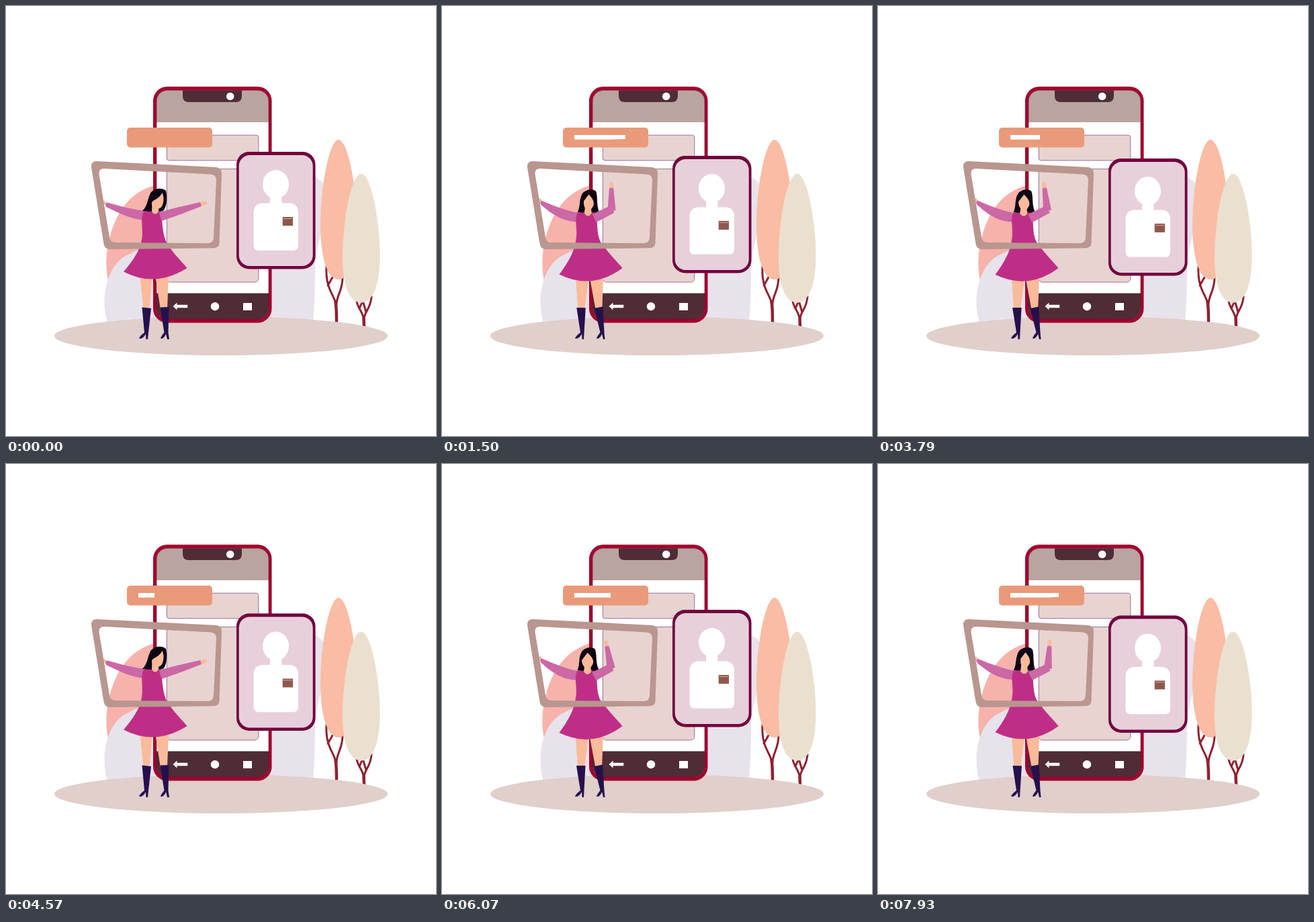
Recreate the animation shown at these times as an HTML page. Size 640x640 px, loop 8 s.

```html
<!DOCTYPE html>
<html lang="en">
<head>
<meta charset="utf-8">
<title>Phone scene</title>
<style>
  html, body { margin: 0; width: 100%; height: 100%; overflow: hidden; background: #fff; }
  svg { display: block; width: 100vw; height: 100vh; }
</style>
</head>
<body>
<svg viewBox="0 0 640 640">
  <defs>
    <clipPath id="reveal"><rect id="revealBox" x="197" y="185" width="0" height="20"/></clipPath>
    <clipPath id="screen"><rect x="224" y="125.500" width="167" height="340.500" rx="16"/></clipPath>
  </defs>

  <!-- backdrop -->
  <path fill="#f7b2ab" d="M153 414C146 385 149 354 161 324C174 292 196 273 222 267L240 400Z"/>
  <path fill="#e8e2eb" d="M151 472C141 440 147 392 176 373C230 345 320 310 400 270C440 245 470 249 478 275C483 308 462 345 460 390Q460 430 457 472Z"/>

  <!-- trees -->
  <g fill="none" stroke="#8f2230" stroke-width="3" stroke-linecap="round">
    <path stroke-width="4.500" d="M492 472Q492 450 490.500 440"/>
    <path d="M490.500 443C489 430 475 421 477 388M479 416L487 402M492 444C492 430 501 425 501 403"/>
    <path stroke-width="4.500" d="M533 478L532.500 465"/>
    <path d="M532.500 468C532 455 524 452 522 439M533 466C533 455 543 451 544 432M536 456L532 442M526 450L530 441"/>
  </g>
  <path fill="#fabca4" d="M495 199C508 199 522 265 522 325C522 380 511 407 495 407C479 407 468 378 468 326C468 265 482 199 495 199Z"/>
  <path fill="#ebe0cf" d="M528.500 249.500C543 249.500 556.500 318 556.500 372C556.500 415 546 441.500 529 441.500C511 441.500 501 417 501 374C501 318 514 249.500 528.500 249.500Z"/>
  <ellipse cx="320" cy="491" rx="248" ry="29" fill="#e0cfcb"/>

  <!-- phone -->
  <rect x="219" y="120" width="176.500" height="351.500" rx="21" fill="#a3002e"/>
  <g clip-path="url(#screen)">
    <path fill="#fff" d="M224 125H391V467H224Z"/>
    <path fill="#baa49f" d="M224 125H391V173H224Z"/>
    <path fill="#4f2c36" d="M224 427.500H391V467H224Z"/>
    <path fill="#4f2c36" d="M263 125H351V134Q351 143 342 143H272Q263 143 263 134Z"/>
  </g>
  <rect x="224" y="125.500" width="167" height="340.500" rx="16" fill="none" stroke="#6b1230" stroke-width=".6"/>
  <g fill="#fff">
    <circle cx="333.700" cy="134.500" r="5.800"/>
    <path d="M248.500 447L254.500 441.500V444.800H270.300V449.200H254.500V452.500Z"/>
    <circle cx="311" cy="447.200" r="6.200"/>
    <path d="M353 442H366V453H353Z"/>
  </g>
  <g fill="#e8d3d0" stroke="#8d6596" stroke-width=".9">
    <rect x="239.300" y="192.200" width="136.500" height="37.700" rx="3.500"/>
    <rect x="239.300" y="242.500" width="136.500" height="168.500" rx="5.500"/>
  </g>
  <rect x="180" y="181" width="127" height="29.500" rx="5" fill="#e99a7a"/>
  <path clip-path="url(#reveal)" fill="#fff" d="M197 192H293V198Q272 197.600 250 198.700H197Z"/>

  <g id="girl"></g>

  <!-- held frame -->
  <path fill="#b9968f" fill-rule="evenodd" d="M135 231L313 240Q321.500 241 321 250L317.500 353Q317 360 309 360.300L155 362Q147 362 145.500 354L127 240Q126.500 231 135 231ZM146 242Q138 242 138.500 250L154 344Q155.500 352 162 352L301 353Q308.500 352.500 309 345L313 259Q313 251.500 305 250.500Z"/>

  <g id="card">
    <rect x="343" y="217" width="117.500" height="174.500" rx="19" fill="#71003d"/>
    <rect x="346.700" y="222" width="110" height="165" rx="16" fill="#e7d0db"/>
    <g fill="#fff">
      <ellipse cx="401.500" cy="265.500" rx="19.500" ry="21.500"/>
      <path d="M393 280H410.300V296H393Z"/>
      <path d="M383 293.500H421Q435 293.500 435 308V356Q435 363.700 427 363.700H376.500Q368.500 363.700 368.500 356V308Q368.500 293.500 383 293.500Z"/>
    </g>
    <path fill="#8f574c" d="M411.700 314H427V327H411.700Z"/>
    <path stroke="#d0aaa4" stroke-width="1" d="M413 316.500H426"/>
  </g>
</svg>

<script>
const NS = "http://www.w3.org/2000/svg";
const SKIN = "#f9bb9a", DRESS = "#bf2e86", SLEEVE = "#cb68a5", HAIR = "#0d0313", BOOT = "#25104d";
const $ = id => document.getElementById(id);
const lerp = (a, b, k) => a + (b - a) * k;
const clamp = v => Math.max(-1, Math.min(1, v));
const TAU = Math.PI * 2;

function addPath(fill) {
  const el = document.createElementNS(NS, "path");
  el.setAttribute("fill", fill);
  $("girl").append(el);
  return el;
}

// Each part: colour, arms-out outline, raised-arm outline.
const parts = [
  [SKIN, "M199 398H218L213.500 452H204.500Z", "M198.500 400H219L212 452H202Z"],
  [SKIN, "M222 400H242L240 452H230Z", "M219 402H240L238 452H228.500Z"],
  [BOOT, "M202.500 448.500L216 450L212 486L211 496H208.500L208 488Q204 496 198 495Q199 491 206 486Z",
         "M200 449L213.500 449L211.500 486L211 496H208.500L208 488Q204 496 198 495Q199 491 206 486Z"],
  [BOOT, "M229.500 448.500L242.500 448L241.500 486L243 496H240L238 488Q235 496 230 495Q231 491 235.500 486Z",
         "M226.500 450L239 447.500L241.500 486L242.500 496H240L238 488Q235 496 230 495Q231 491 235.500 486Z"],
  [SKIN, "M152 294L145 289.500Q143 292 146 295L152 299Z", "M150 291L146 285.500Q142 288 145 292L149 295Z"],
  [SLEEVE, "M206 305C188 303 167 297 151 292.500C147 294 147 298 151 300C170 309 186 317 206 319Z",
           "M203 308C187 306 166 297 148.500 289.500C145 291 146 295 149 297C163 310 180 322 203 321.500Z"],
  [DRESS, "M205 306Q218 303 230 305C233 318 232 335 238 350C247 367 260 378 269.500 390Q222 420 175 395.500C188 380 199 365 202 348C205 332 199 318 205 306Z",
          "M201 308Q216 305 229 308C232 320 229 336 235 350C246 366 258 378 268.500 390Q224 424 174.500 400C188 382 197 365 199 348C202 332 196 320 201 308Z"],
  [HAIR, "M203 305C211 298 211 284 216 277C222 271 232 270 238 275C240 283 240 296 235 304C232 306 230 306 226 305C216 306 210 306 203 305Z",
         "M201.500 307C206 300 202 285 210 277C216 273 223 271 228 276C231 285 228 295 233.500 306C229 309 226 309 222 306C214 308 208 308 201.500 307Z"],
  [SKIN, "M217.500 293L227 298L227 306Q222 313 217 306Z", "M212.500 299L221 299L222 309Q217 317 211 309Z"],
  [SKIN, "M232.500 278C236 284 235 298 229 301C224 304 217 301 217 294C217 288 227 289 232.500 278Z",
         "M216.500 281C221 285 226 290 225 296C223 302 219 306 216.500 306C212 304 208 298 208 292C209 288 214 285 216.500 281Z"]
].map(([fill, out, up]) => ({ el: addPath(fill), out, up: up.match(/[\d.]+/g).map(Number) }));

const hand = addPath(SKIN);
const foreArm = addPath(SLEEVE);
const upperArm = addPath(SLEEVE);
for (const el of [hand, foreArm, upperArm]) {
  el.setAttribute("stroke", el.getAttribute("fill"));
  el.setAttribute("stroke-width", 3);
  el.setAttribute("stroke-linejoin", "round");
}

// Tapered limb from a to b.
function limb(el, a, b, widthA, widthB) {
  const dx = b[0] - a[0], dy = b[1] - a[1], len = Math.hypot(dx, dy);
  const nx = -dy / len / 2, ny = dx / len / 2;
  const corner = (p, w) => [p[0] + nx * w, p[1] + ny * w];
  el.setAttribute("d", "M" + [corner(a, widthA), corner(b, widthB), corner(b, -widthB), corner(a, -widthA)].join("L") + "Z");
}

function poseGirl(k) {
  for (const { el, out, up } of parts) {
    let i = 0;
    el.setAttribute("d", out.replace(/[\d.]+/g, n => lerp(+n, up[i++], k).toFixed(2)));
  }
  const shoulder = [lerp(231, 227.5, k), lerp(313, 315.5, k)];
  const elbow = [lerp(259, 251.5, k), lerp(304.5, 303, k)];
  const angle = lerp(17, 101, k) * Math.PI / 180;
  const along = d => [elbow[0] + d * Math.cos(angle), elbow[1] - d * Math.sin(angle)];
  limb(hand, along(28), along(lerp(40, 39.5, k)), 4, 2);
  limb(foreArm, elbow, along(31), lerp(8, 9, k), 3.5);
  limb(upperArm, shoulder, elbow, 10.5, lerp(8, 9, k));
}

// Progress of the white line: [time, width].
const barKeys = [[0, 0], [1900, 96], [2500, 96], [2930, 72], [3790, 44], [4570, 24], [5000, 0]];
function barWidth(t) {
  t %= 5000;
  const i = barKeys.findIndex(key => key[0] > t);
  const [t0, w0] = barKeys[i - 1], [t1, w1] = barKeys[i];
  return lerp(w0, w1, (t - t0) / (t1 - t0));
}

function draw(now) {
  const t = now % 8000;
  $("card").setAttribute("transform", `translate(0 ${5.9 * (1 - Math.cos(TAU * t / 6000))})`);
  $("revealBox").setAttribute("width", barWidth(t));
  poseGirl(0.5 - 0.5 * clamp(1.12 * Math.cos(TAU * t / 2370)));
}

const start = performance.now();
function tick() {
  draw(performance.now() - start);
  requestAnimationFrame(tick);
}
draw(0);
requestAnimationFrame(tick);
</script>
</body>
</html>
```
